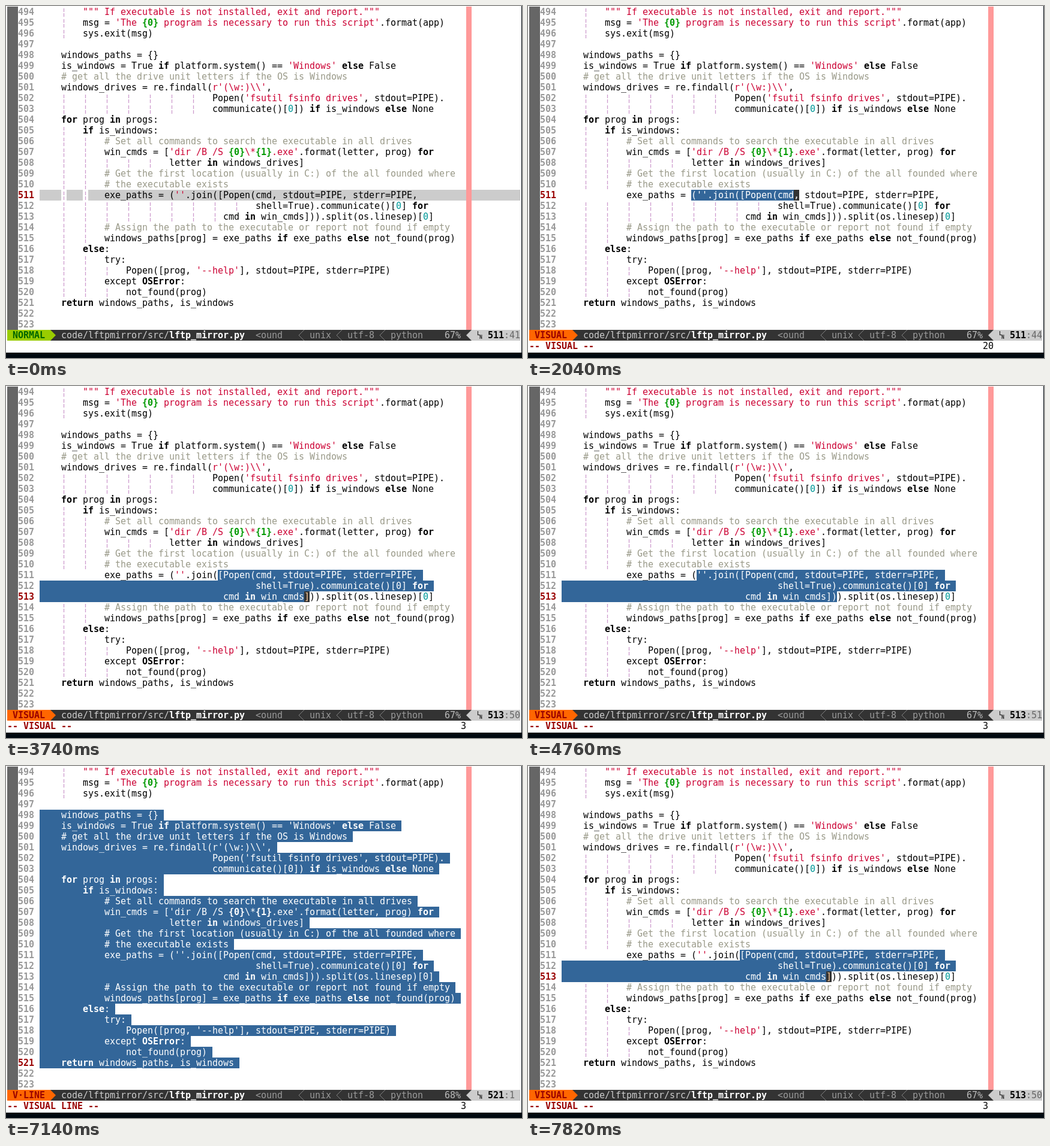
Animation of 860 by 588 pixels, one loop 8 s. Source, as an HTML page with a canvas:

```html
<!DOCTYPE html>
<html lang="en">
<head>
<meta charset="utf-8">
<title>Growing and shrinking a selection</title>
<style>
html, body { margin: 0; width: 100%; height: 100%; overflow: hidden; background: #fff; }
canvas { display: block; }
</style>
</head>
<body>
<canvas id="stage" width="860" height="588"></canvas>
<script>
const ctx = document.getElementById('stage').getContext('2d');
const CW = 9, RH = 18, LEFT = 2, TOP = 1, FIRST = 494, CODE = 6, LOOP = 8000;
const STATUS = 30, MESSAGE = 31;
const INK = '#000', RED = '#cc0033', GREEN = '#009900', TEAL = '#009999', COMMENT = '#999988',
  DARKRED = '#990000', SELECT = '#336699', BAR = '#333333', CURSOR = '#333333';

const code = String.raw`        """ If executable is not installed, exit and report."""
        msg = 'The {0} program is necessary to run this script'.format(app)
        sys.exit(msg)

    windows_paths = {}
    is_windows = True if platform.system() == 'Windows' else False
    # get all the drive unit letters if the OS is Windows
    windows_drives = re.findall(r'(\w:)\\',
                                Popen('fsutil fsinfo drives', stdout=PIPE).
                                communicate()[0]) if is_windows else None
    for prog in progs:
        if is_windows:
            # Set all commands to search the executable in all drives
            win_cmds = ['dir /B /S {0}\*{1}.exe'.format(letter, prog) for
                        letter in windows_drives]
            # Get the first location (usually in C:) of the all founded where
            # the executable exists
            exe_paths = (''.join([Popen(cmd, stdout=PIPE, stderr=PIPE,
                                        shell=True).communicate()[0] for
                                  cmd in win_cmds])).split(os.linesep)[0]
            # Assign the path to the executable or report not found if empty
            windows_paths[prog] = exe_paths if exe_paths else not_found(prog)
        else:
            try:
                Popen([prog, '--help'], stdout=PIPE, stderr=PIPE)
            except OSError:
                not_found(prog)
    return windows_paths, is_windows

`.split('\n');

// Colour and weight of every character in a line
function highlight(text) {
  const cells = [...text].map(ch => ({ ch, color: INK, bold: false }));
  const paint = (start, len, color, bold) => {
    for (let i = start; i < start + len; i++) Object.assign(cells[i], { color, bold });
  };
  const token = /("""[^"]*"""|r?'[^']*')|(#.*)|\b(if|else|for|in|return|OSError)\b|\b(\d)\b/g;
  for (const m of text.matchAll(token)) {
    const [all, string, comment, keyword] = m;
    paint(m.index, all.length, string ? RED : comment ? COMMENT : keyword ? INK : TEAL, !!keyword);
    if (string)
      for (const f of all.matchAll(/\{\d\}/g)) paint(m.index + f.index, 3, GREEN, true);
  }
  return cells;
}
const lines = code.map(highlight);
const indents = code.map(s => s.search(/\S|$/));

// Each selection: cursor line and column, start line and column
const word = { mode: 'VISUAL', at: [511, 43], from: [511, 41], count: 3 };
const bigWord = { mode: 'VISUAL', at: [511, 44], from: [511, 25], count: 20 };
const args = { mode: 'VISUAL', at: [512, 50], from: [511, 41], count: 2 };
const inList = { mode: 'VISUAL', at: [513, 49], from: [511, 35], count: 3 };
const list = { mode: 'VISUAL', at: [513, 50], from: [511, 34], count: 3 };
const parens = { mode: 'VISUAL', at: [513, 51], from: [511, 26], count: 3 };
const block = { mode: 'V·LINE', at: [521, 1], from: [498, 1], count: 24 };
const steps = [
  [0, { mode: 'NORMAL', at: [511, 41] }], [340, word], [2040, bigWord], [2720, args],
  [3060, inList], [3740, list], [4420, parens], [5100, block],
  [7140, { ...block, count: 3 }], [7480, parens], [7820, list]
];
const cursorOff = [[0, 340], [1360, 1700], [4760, 5100], [5440, 5780], [6800, 7480]];

const x = col => LEFT + col * CW;
const y = row => TOP + row * RH;

function fill(col, row, w, color, h = 1) {
  ctx.fillStyle = color;
  ctx.fillRect(x(col), y(row), w * CW, h * RH);
}

function write(text, col, row, color, bold = false) {
  ctx.font = (bold ? 'bold ' : '') + '15px "DejaVu Sans Mono", monospace';
  ctx.fillStyle = color;
  [...String(text)].forEach((ch, i) => ch !== ' ' && ctx.fillText(ch, x(col + i), y(row) + 14));
}

// Status line arrow: dir 1 points right, -1 points left
function arrow(col, dir, color, solid) {
  const base = x(dir > 0 ? col : col + 1), top = y(STATUS);
  ctx.beginPath();
  ctx.moveTo(base, top);
  ctx.lineTo(base + dir * CW, top + RH / 2);
  ctx.lineTo(base, top + RH);
  ctx.fillStyle = ctx.strokeStyle = color;
  ctx.lineWidth = 1;
  solid ? ctx.fill() : ctx.stroke();
}

function isSelected(s, n, i) {
  const [line, col] = s.at;
  if (!s.from || n < s.from[0] || n > line) return false;
  if (s.mode === 'V·LINE') return true;
  return (n > s.from[0] || i >= s.from[1] - 1) && (n < line || i < col);
}

function drawLine(s, row, cursorOn) {
  const n = FIRST + row, cells = lines[row], current = n === s.at[0];
  const inArea = s.from && n >= s.from[0] && n <= s.at[0];
  if (current && !s.from) fill(CODE, row, 89, '#cccccc');
  fill(CODE + 79, row, 1, '#ff9999');
  write(n, 2, row, current ? DARKRED : '#999999', true);
  if (!inArea)
    for (let i = 4; i < indents[row]; i += 4) {
      fill(CODE + i, row, 1, '#fff');
      write('¦', CODE + i, row, '#cc99cc');
    }
  for (let i = 0; i <= cells.length; i++) {
    const { ch, color, bold } = cells[i] || { ch: ' ' };
    const selected = isSelected(s, n, i);
    const cursor = cursorOn && current && i === s.at[1] - 1;
    if (selected || cursor) fill(CODE + i, row, 1, cursor ? CURSOR : SELECT);
    const lit = cursor && ch === ']' ? '#ffcc99' : '#fff';
    write(ch, CODE + i, row, selected || cursor ? lit : color, bold);
  }
}

function drawStatus(s) {
  const normal = s.mode === 'NORMAL', back = normal ? '#99cc00' : '#ff6600';
  const [line, col] = s.at;
  fill(0, STATUS, 95, BAR);
  fill(0, STATUS, 8, back);
  arrow(8, 1, back, true);
  write(s.mode, 1, STATUS, normal ? '#006600' : DARKRED, true);
  write('code/lftpmirror/src/', 10, STATUS, '#cccccc');
  write('lftp_mirror.py', 30, STATUS, '#fff', true);
  write('<ound', 46, STATUS, '#999999');
  [[54, 'unix'], [61, 'utf-8'], [69, 'python']].forEach(([c, text]) => {
    arrow(c, -1, '#808080', false);
    write(text, c + 2, STATUS, '#999999');
  });
  write(line > 513 ? '68%' : '67%', 81, STATUS, '#bbbbbb');
  arrow(85, -1, '#cccccc', true);
  fill(86, STATUS, 9, '#cccccc');
  ctx.font = 'bold 8px "DejaVu Sans Mono", monospace';
  ctx.fillStyle = '#222';
  ctx.fillText('L', x(87), y(STATUS) + 9);
  ctx.fillText('N', x(87) + 4, y(STATUS) + 15);
  write(line, 89, STATUS, INK, true);
  write(':' + col, 92, STATUS, '#666666');
}

function draw(now) {
  const t = now % LOOP;
  const s = steps.filter(([start]) => start <= t).pop()[1];
  const cursorOn = !cursorOff.some(([a, b]) => t >= a && t < b);
  ctx.fillStyle = '#fff';
  ctx.fillRect(0, 0, 860, 588);
  fill(0, 0, 2, '#666666', 30);
  lines.forEach((_, row) => drawLine(s, row, cursorOn));
  drawStatus(s);
  if (s.from) {
    write(s.mode === 'VISUAL' ? '-- VISUAL --' : '-- VISUAL LINE --', 0, MESSAGE, DARKRED, true);
    write(s.count, 84, MESSAGE, INK);
  }
  ctx.fillStyle = '#00080f';
  ctx.fillRect(0, 579, 860, 9);
  ctx.fillRect(859, 0, 1, 588);
  requestAnimationFrame(draw);
}
requestAnimationFrame(draw);
</script>
</body>
</html>
```
